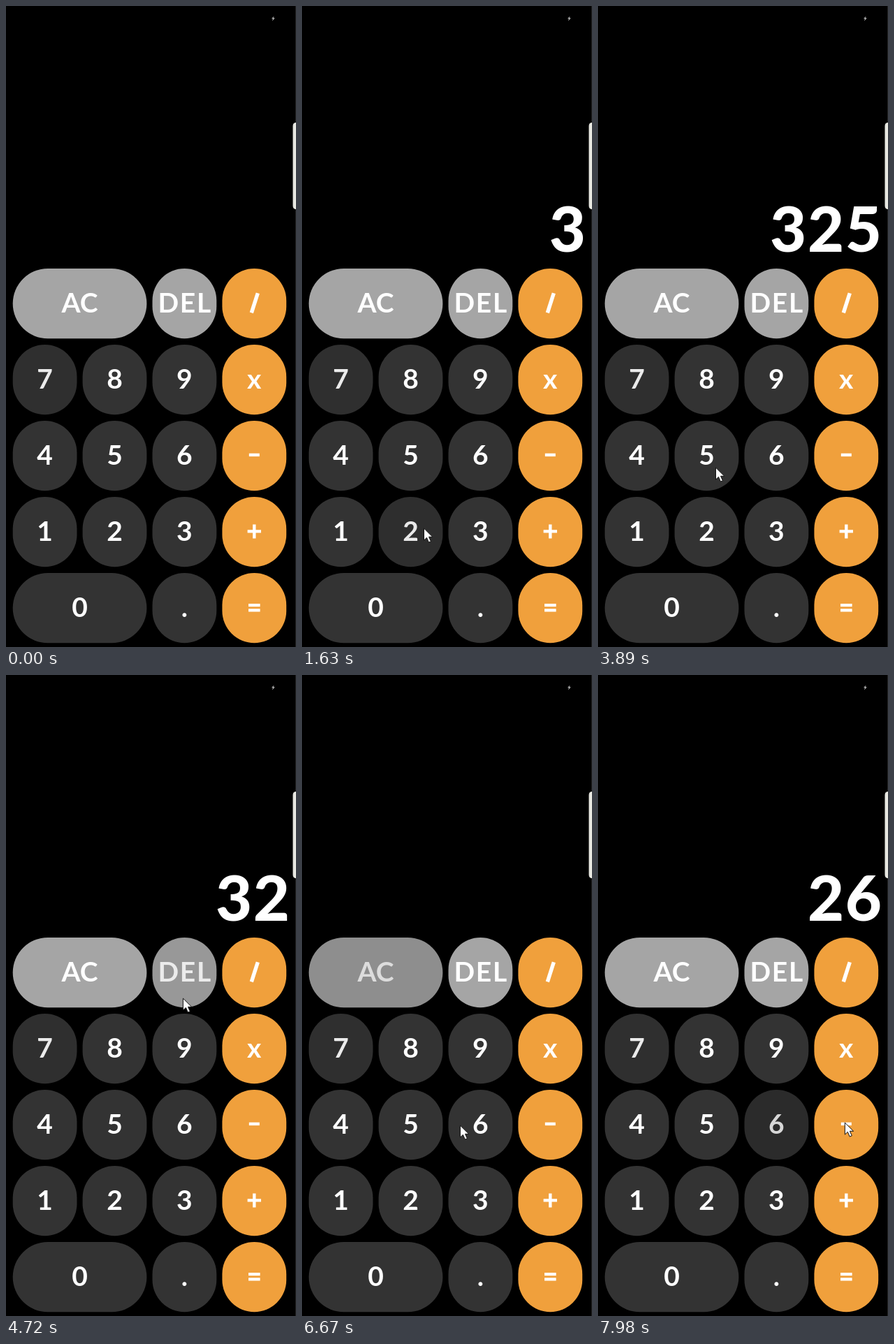
An HTML page that plays this animation: 415x918 px, repeating every 8 s.

```html
<!DOCTYPE html>
<html lang="en">
<head>
<meta charset="utf-8">
<title>Calculator</title>
<style>
  html, body { margin: 0; width: 100%; height: 100%; overflow: hidden; background: #000; }
  svg { display: block; width: 100%; height: 100%; }
  text { font-family: Lato, "Open Sans", sans-serif; fill: #fff; }
  .label { font-size: 39px; font-weight: 700; text-anchor: middle; }
  .display { font-size: 90px; font-weight: 800; text-anchor: end; letter-spacing: 1.6px; }
</style>
</head>
<body>
<svg viewBox="0 0 415 918">
  <rect width="415" height="918"/>
  <path d="M383.5 14.5L380 18.2H382L381 21.5L384.8 17.3H382.6Z" fill="#bbb"/>
  <rect x="414.4" width=".6" height="918" fill="#3a3a3a"/>
  <path d="M415 167Q410.5 167 410.5 172V286Q410.5 291 415 291Z" fill="#e8e8e2"/>
  <text id="display" class="display" x="407.5" y="351.5"></text>
  <g id="keys"></g>
  <path id="cursor" d="M0 0V17L4 13.3L6.9 20L10 18.7L7.1 12.2H12.3Z"
        fill="#fff" stroke="#111" stroke-linejoin="round"/>
</svg>
<script>
const LOOP = 8000;
const PRESS = 150, RELEASE = 180, RECOVER = 250, DIM = 0.2;
const LAG = 150, TRAVEL = 250;
const LEFT = 9.7, TOP = 376, PITCH_X = 99.9, PITCH_Y = 109, KEY_W = 91.8, KEY_H = 100.2;
const GRAY = '#a5a5a5', DARK = '#333', ORANGE = '#f0a03c';

// A null continues the key to its left
const ROWS = [
  ['AC', null, 'DEL', '/'],
  ['7', '8', '9', 'x'],
  ['4', '5', '6', '-'],
  ['1', '2', '3', '+'],
  ['0', null, '.', '=']
];

// Operator strokes around the key's centre
const SIGNS = {
  '/': 'M5 -14.8L-4 13.3',
  '-': 'M-7.5 -1.2H7.5',
  '+': 'M-9.7 -.7H9.7M0 -10.5V9.5',
  '=': 'M-8.3 -4H8.3M-8.3 3.3H8.3'
};

// Pointer stops; the pointer clicks first and the key reacts LAG later
const tap = (key, at, dx = 5, dy = 8) => ({ key, at, dx, dy, start: at + LAG });
const hover = (key, at, dx, dy) => ({ key, at, dx, dy });
const STOPS = [
  tap('3', 450), tap('2', 1446, 19, -5), tap('5', 2368, 13, 17),
  tap('DEL', 4196, -2, 37), tap('9', 4980),
  tap('6', 5726), hover('-', 5910, -34, -3),
  tap('AC', 6164), hover('6', 6670, -29, 1),
  tap('2', 6850), tap('6', 7479), hover('-', 7980, -2, -3)
];
const TAPS = STOPS.filter(stop => stop.start);

const $ = id => document.getElementById(id);
const keys = {};

function add(parent, tag, attrs, text = '') {
  const el = document.createElementNS('http://www.w3.org/2000/svg', tag);
  for (const name in attrs) el.setAttribute(name, attrs[name]);
  el.textContent = text;
  return parent.appendChild(el);
}

function addKey(label, row, col) {
  const wide = ROWS[row][col + 1] === null;
  const width = KEY_W + (wide ? PITCH_X : 0);
  const x = LEFT + col * PITCH_X, y = TOP + row * PITCH_Y;
  const cx = x + width / 2, cy = y + KEY_H / 2;
  const fill = col === 3 ? ORANGE : row === 0 ? GRAY : DARK;
  const el = add($('keys'), 'g', {});
  add(el, 'rect', { x, y, width, height: KEY_H, rx: Math.min(width, KEY_H) / 2, fill });
  if (SIGNS[label]) {
    add(el, 'path', {
      d: SIGNS[label], stroke: '#fff', fill: 'none', 'stroke-width': label === '/' ? 5.4 : 4.4,
      transform: `translate(${cx} ${cy})`
    });
  } else {
    const spacing = label === 'DEL' ? 1.6 : 0;
    add(el, 'text', { x: cx + spacing / 2, y: cy + 13.3, class: 'label', 'letter-spacing': spacing }, label);
  }
  keys[label] = { el, cx, cy };
}

ROWS.forEach((row, r) => row.forEach((label, c) => label && addKey(label, r, c)));

const clamp = v => Math.min(1, Math.max(0, v));
const ease = p => p < 0.5 ? 2 * p * p : 1 - 2 * (1 - p) * (1 - p);
const ramp = (t, from, length) => ease(clamp((t - from) / length));

function opacity(label, t) {
  const rest = label === '7' ? 0.92 : 1;
  const dims = TAPS.filter(s => s.key === label)
    .map(s => ramp(t, s.start, PRESS) - ramp(t, s.start + RELEASE, RECOVER));
  return rest - (rest - DIM) * Math.max(0, ...dims);
}

function displayAt(t) {
  return TAPS.filter(s => t >= s.start + RELEASE).reduce((value, { key }) =>
    key === 'AC' ? '' : key === 'DEL' ? value.slice(0, -1) : value + key, '');
}

// Rests at each stop until it has to leave for the next one
function pointerAt(t) {
  let x = 272, y = 920, last = 0;
  for (const { key, at, dx, dy } of STOPS) {
    const leave = Math.max(last, at - TRAVEL);
    const p = ramp(t, leave, at - leave);
    x += (keys[key].cx + dx - x) * p;
    y += (keys[key].cy + dy - y) * p;
    last = at;
  }
  return [x, y];
}

function draw(t) {
  $('display').textContent = displayAt(t);
  for (const label in keys) keys[label].el.setAttribute('opacity', opacity(label, t));
  $('cursor').setAttribute('transform', `translate(${pointerAt(t)})`);
}

const began = performance.now();
function tick() {
  draw((performance.now() - began) % LOOP);
  requestAnimationFrame(tick);
}
draw(0);
requestAnimationFrame(tick);
</script>
</body>
</html>
```
